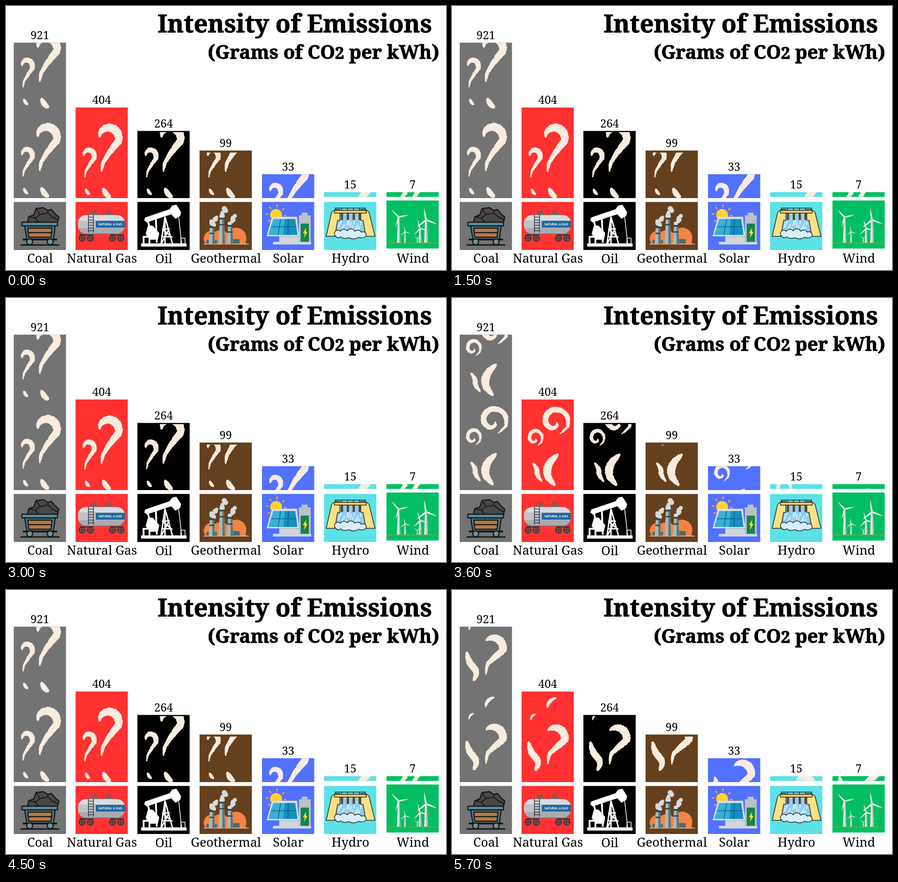
An HTML page that plays this animation: 966 by 580 pixels, repeating every 6.01 s.

```html
<!DOCTYPE html>
<html lang="en">
<head>
<meta charset="utf-8">
<title>Intensity of Emissions</title>
<style>
  html, body { margin: 0; width: 100%; height: 100%; overflow: hidden; background: #fff; }
  svg { display: block; }
  text { font-family: "Noto Serif", serif; text-anchor: middle; }
  .title { font-weight: 700; stroke: #000; stroke-width: 1; }
  .label { font-size: 27.4px; }
  .value { font-size: 24.5px; }
  .tank { font: 700 6.3px "Liberation Sans", sans-serif; fill: #fff; }
</style>
</head>
<body>
<svg id="stage" width="966" height="580" viewBox="0 0 966 580">
  <rect width="966" height="580" fill="#fff"/>
  <text class="title" x="634" y="57.5" font-size="54">Intensity of Emissions</text>
  <text class="title" x="697" y="116" font-size="41.5">(Grams of CO<tspan font-size="36">2</tspan> per kWh)</text>
  <g id="bars"></g>

  <g id="coal" stroke="#151515" stroke-width="2.5" stroke-linejoin="round">
    <path d="M47 475 50 463 61 459 66 445 82 443 92 449 100 447 109 458 116 464 113 476Z" fill="#484848"/>
    <path d="M50 463 64 466 72 475M66 445 75 458 92 455V449M75 458 64 466M92 455 101 463 114 470" fill="none" stroke-width="2"/>
    <path d="M41 483H108L104 513H46Z" fill="#4d7b8d"/>
    <path d="M35 475H113V483H35Z" fill="#5b8ca0"/>
    <path d="M48 488H101L99 508H50ZM49 498H100" fill="#b37b46"/>
    <path d="M37 513H112" stroke-width="4"/>
    <path d="M32 525H117" stroke-width="3"/>
  </g>

  <g id="gas" fill="none">
    <path d="M160 499H260V506H160Z" fill="#d94a43"/>
    <path d="M187 454H232" stroke="#a84a3d" stroke-width="10" stroke-dasharray="13 19"/>
    <path d="M184 457.5H235" stroke="#6c6870" stroke-width="4" stroke-dasharray="19 13"/>
    <rect x="158" y="459" width="103" height="41" rx="18" fill="#bfc3c8"/>
    <path d="M174 460H245Q257 462 260 471H159Q163 461 174 460Z" fill="#d9dbdd"/>
    <path d="M160 488H260Q256 499 243 500H176Q164 498 160 488Z" fill="#a7abb2"/>
    <path d="M197 472H261V487H197Z" fill="#1f689f"/>
    <text class="tank" x="229" y="482">NATURAL &amp; GAS</text>
    <path d="M181 459V498M192 459V498" stroke="#343641" stroke-width="1.6"/>
    <path d="M186.5 463V496" stroke="#343641" stroke-width="11" stroke-dasharray="1.6 4.4"/>
    <path d="M162 503H259" stroke="#3b3b42" stroke-width="3" stroke-dasharray="30 37"/>
  </g>

  <g id="oil" fill="#fff" stroke="#fff">
    <path d="M306 465 359 447 365 439 374 437 384 453 382 461 372 467 363 457 309 475 304 471Z"/>
    <path d="M297 522H396V528H297Z"/>
    <path d="M312 483H322L336 499 333 513H316L307 501Z"/>
    <path d="M340 524 349 463 366 524M349 463V524M343 490H358L341 522M341 507H363L343 490" fill="none" stroke-width="3"/>
    <path d="M311 471 322 511M329 466 331 520M302 522V507H315V522" fill="none" stroke-width="4"/>
    <path d="M379 463 386 525M384 510H393V524H384Z" fill="none" stroke-width="1.6"/>
  </g>

  <g id="geothermal">
    <path d="M439 523A17 17 0 0 1 459 496 22 22 0 0 1 486 499 22 22 0 0 1 527 514L526 523Z" fill="#f58345"/>
    <path d="M440 514H463V523H440ZM498 512H513V523H498Z" fill="#456d72"/>
    <path d="M434 523H533" stroke="#d9b391" stroke-width="2"/>
  </g>

  <g id="solar">
    <circle cx="593" cy="459" r="20" fill="none" stroke="#f5a04c" stroke-width="6" stroke-dasharray="3 12.7"/>
    <circle cx="593" cy="459" r="13" fill="#ffd328"/>
    <path d="M590 463H640V518H600V504H578Z" fill="#a9b1b7"/>
    <path d="M584 463H638L644 506H572Z" fill="#d8dde0"/>
    <path d="M587 468H635L640 503H576Z" fill="#158fc1"/>
    <path d="M587 468H612L609 503H576Z" fill="#38b1d5"/>
    <path d="M603 468 597 503M620 468 619 503M582 485H638" stroke="#075f91" stroke-width="1.5"/>
    <path d="M600 507H643V518H600ZM586 518H670V524H586Z" fill="#d0d6da"/>
    <path d="M649 454H662V461H649ZM643 460H669V519H643Z" fill="#b9c2c5"/>
    <path d="M647 478H665V518H647Z" fill="#16834b"/>
    <path d="M659 487 652 499H656L654 510 662 496H658Z" fill="#ffe52c"/>
  </g>

  <g id="hydro" stroke="#242424" stroke-width="1.5" stroke-linejoin="round">
    <path d="M723 451H789L791 504H721Z" fill="#8fcdf0"/>
    <g id="falls" stroke="#e8f7ff" stroke-width="2"></g>
    <path d="M723 447H733V471H728L722 506H703L715 453ZM789 447H779V471H784L790 506H810L797 453Z" fill="#fbe182"/>
    <path d="M735 461.5H779" stroke="#5f432e" stroke-width="17" stroke-dasharray="5 8"/>
    <path d="M721 449H791V455H721Z" fill="#f5d363"/>
    <path d="M723 446.5H790" stroke-width="7" stroke-dasharray="1.5 11.5"/>
    <path d="M722 444H790"/>
    <path d="M723 505A7 7 0 0 1 734 495 9 9 0 0 1 749 494 10 10 0 0 1 766 495 9 9 0 0 1 780 497 7 7 0 0 1 790 506Q783 512 774 508 764 515 753 509 741 513 735 507 728 512 723 505Z" fill="#d6eefa"/>
  </g>

  <g id="wind"><path d="M837 521H949" stroke="#65a744" stroke-width="3"/></g>
</svg>
<script>
const byId = id => document.getElementById(id);
const bars = byId("bars");

function add(parent, tag, attrs, text) {
  const node = document.createElementNS("http://www.w3.org/2000/svg", tag);
  for (const key in attrs) node.setAttribute(key, attrs[key]);
  if (text) node.textContent = text;
  parent.append(node);
  return node;
}

let seed = 17;
const random = () => (seed = seed * 16807 % 2147483647) / 2147483647;

// A wisp is a tail through key points, then part of a spiral that tightens inwards.
const curl = (x, y, size, from, to) => Array.from({ length: 9 }, (_, i) => {
  const u = from + (to - from) * i / 8;
  const angle = (70 - 430 * u) * Math.PI / 180, r = size * (1 - u ** 2.5);
  return [x + r * Math.cos(angle), y + r * Math.sin(angle)];
});
const tail = text => text ? text.split(" ").map(p => p.split(",").map(Number)) : [];
const wisp = (width, points, head = []) => ({ width, line: tail(points).concat(head) });

// The left plume repeats the right one, smaller and lower.
const pair = (w, lift = 0) => [w, {
  width: w.width * .62,
  line: w.line.map(([x, y]) => [.55 * x - 3.4, .62 * y + 147 - lift])
}];

const poses = [
  [...pair(wisp(9.5, "74,363 79,340 96,315", curl(88, 288, 24, .12, .58)), -3),
   ...pair(wisp(6, "94,420 84,411 77,398"), -6)],
  [...pair(wisp(8.5, "84,334 95,315", curl(90, 283, 27, .1, .74)), 4),
   ...pair(wisp(8, "93,413 77,393 80,373 88,361"))],
  [...pair(wisp(6.5, "", curl(91, 270, 29, 0, .95)), 8),
   wisp(9, "91,411 74,388 78,362 98,341"), wisp(5.5, "62,403 52,387 50,374 41,360")],
  [...pair(wisp(5, "", curl(91, 270, 28, .32, .76)), 16),
   wisp(9, "80,403 75,385 82,358 97,345", curl(82, 338, 20, .16, .38)), wisp(6.5, "53,397 52,374 44,357 36,341")],
  [...pair(wisp(4, "", curl(95, 261, 28, .38, .56)), 22),
   wisp(9, "74,382 78,360 94,344", curl(88, 323, 24, .13, .47)), wisp(7.5, "47,396 53,376 38,353 32,331")]
];

function spline(points, at) {
  const i = Math.min(points.length - 2, Math.floor(at)), t = at - i;
  const p = k => points[Math.max(0, Math.min(points.length - 1, i + k))];
  return [0, 1].map(j => {
    const a = p(-1)[j], b = p(0)[j], c = p(1)[j], d = p(2)[j];
    return b + .5 * t * (c - a + t * (2 * a - 5 * b + 4 * c - d + t * (3 * (b - c) + d - a)));
  });
}

// Outlines a wisp with tapered ends and a dry-brush edge.
function brush({ line, width }) {
  const steps = 70, left = [], right = [];
  const point = t => spline(line, Math.max(0, Math.min(1, t)) * (line.length - 1));
  for (let i = 0; i <= steps; i++) {
    const t = i / steps, [x, y] = point(t), p = point(t - .01), q = point(t + .01);
    const dx = q[0] - p[0], dy = q[1] - p[1], len = Math.hypot(dx, dy) || 1;
    const r = width * Math.max(0, Math.sin(Math.PI * t)) ** .6;
    const edge = side => {
      const w = side * Math.max(.4, r + (random() - .5) * 1.6) / len;
      return (x - dy * w).toFixed(1) + " " + (y + dx * w).toFixed(1);
    };
    left.push(edge(1));
    right.unshift(edge(-1));
  }
  return "M" + left.concat(right).join("L") + "Z";
}
const smoke = poses.map(wisps => wisps.map(brush).join(""));

const sources = [
  { name: "Coal", value: 921, x: 17, top: 80.5, color: "#737373", drops: [0, -196] },
  { name: "Natural Gas", value: 404, x: 152.7, top: 223, color: "#ff3131" },
  { name: "Oil", value: 264, x: 288.5, top: 274.5, color: "#000000", crop: 277 },
  { name: "Geothermal", value: 99, x: 425, top: 317.5, color: "#65401f", crop: 322 },
  { name: "Solar", value: 33, x: 562, top: 369.5, color: "#5271ff", drops: [79] },
  { name: "Hydro", value: 15, x: 698.3, top: 409, color: "#5ce1e6", end: 419.5, drops: [111] },
  { name: "Wind", value: 7, x: 835.3, top: 409, color: "#00bf63", end: 419.5, tile: 427.3, drops: [78] }
];

const plumes = [];
for (const { name, value, x, top, color, crop = top, end = 422, tile = 430.5, drops = [1.5] } of sources) {
  const width = 114.7, height = end - crop, center = x + width / 2;
  add(bars, "rect", { x, y: top, width, height: end - top, fill: color });
  add(bars, "rect", { x, y: tile, width, height: 105.5, fill: color });
  const view = add(bars, "svg", { x, y: crop, width, height, viewBox: [x, crop, width, height].join(" ") });
  for (const drop of drops)
    plumes.push(add(view, "path", { transform: `translate(${x - 17} ${drop})`, fill: "#f8ecdf" }));
  add(bars, "text", { class: "value", x: center, y: top - 8 }, String(value));
  add(bars, "text", { class: "label", x: center + .5, y: name === "Oil" ? 565 : 563.5 }, name);
}

for (const x of [52, 97]) add(byId("coal"), "circle", { cx: x, cy: 518, r: 6.5, fill: "#6d91a0" });

for (const x of [167, 185, 234, 252]) {
  add(byId("gas"), "circle", { cx: x, cy: 510, r: 6.5, fill: "#8c4740", stroke: "#34343b", "stroke-width": 2 });
  add(byId("gas"), "path", { d: `M${x - 6} 510h12m-6 -6v12`, stroke: "#34343b", "stroke-width": 1.2 });
}

function chimney(x, top, puffs) {
  const g = byId("geothermal");
  for (let i = 0; i < puffs; i++)
    add(g, "circle", { cx: x + i * 1.6 + (random() - .5) * 9, cy: top - 3 - i * 4.2, r: 3.5 + random() * 3, fill: "#d9d9d6" });
  add(g, "path", { d: `M${x - 4.5} ${top}h9L${x + 7} 523H${x - 7}Z`, fill: "#a8b9b8" });
  add(g, "path", { d: `M${x + 1} ${top}h3.5L${x + 7} 523H${x + 1}Z`, fill: "#607779" });
  add(g, "path", { d: `M${x - 5.5} ${top}h11v4h-11zm0 14h11v3h-11z`, fill: "#304d52" });
}
chimney(452, 484, 5);
chimney(474, 465, 5);
chimney(492, 481, 5);

for (let i = 0; i < 14; i++)
  add(byId("falls"), "path", { d: `M${732 + i * 3.7} ${470 + random() * 18}l-2 ${6 + random() * 8}` });

function turbine(x, y, size, angle) {
  const g = byId("wind"), w = size / 7;
  add(g, "path", { d: `M${x - w / 2} ${y}h${w}L${x + w} 520H${x - w}Z`, fill: "#e3e7e4" });
  add(g, "path", { d: `M${x + w / 5} ${y}h${w * .3}L${x + w} 520H${x + w / 5}Z`, fill: "#b4c2ba" });
  for (let i = 0; i < 3; i++) {
    const blade = add(g, "g", { transform: `translate(${x} ${y}) rotate(${angle + i * 120})` });
    add(blade, "path", { d: `M0 ${-w / 2}H${size * .35}L${size} 0 0 ${w / 2}Z`, fill: "#f0f2ef" });
    add(blade, "path", { d: `M${size * .86} 0H${size}`, stroke: "#d95549", "stroke-width": w / 2 });
  }
  add(g, "circle", { cx: x, cy: y, r: w * .7, fill: "#cbd4cf" });
}
turbine(909, 489, 22, -105);
turbine(876, 496, 14, -100);
turbine(903, 510, 9, -30);
turbine(862, 464, 25, -12);
turbine(922, 470, 29, -98);

const start = performance.now();
let shown = -1;
function tick() {
  const step = Math.min(19, Math.floor((performance.now() - start) % 6010 / 300));
  const pose = step % smoke.length;
  if (pose !== shown) {
    plumes.forEach(path => path.setAttribute("d", smoke[pose]));
    shown = pose;
  }
  requestAnimationFrame(tick);
}
tick();
</script>
</body>
</html>
```
